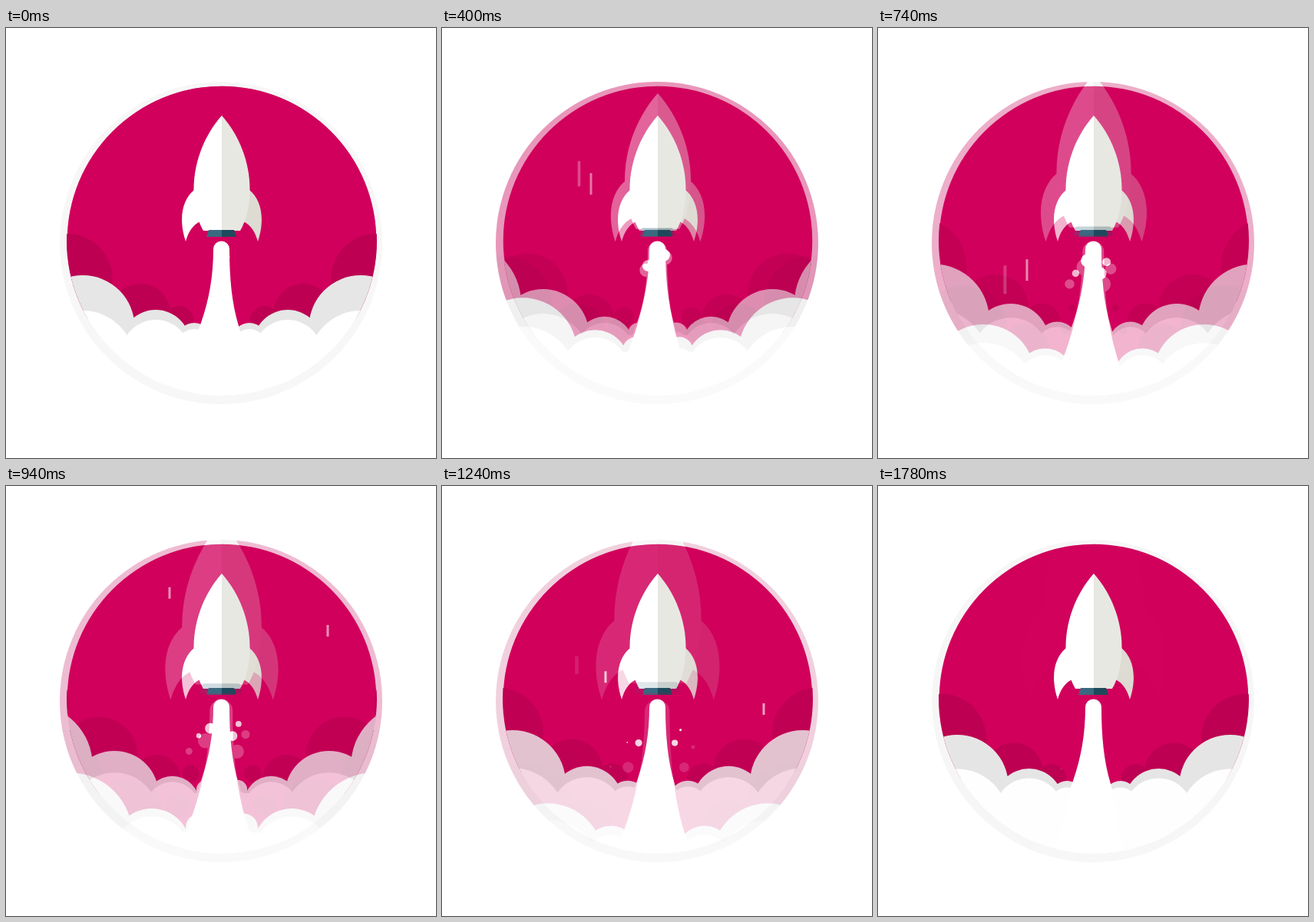
An HTML page that plays this animation: 560x560 px, repeating every 1.8 s.

```html
<!DOCTYPE html>
<html lang="en">
<head>
<meta charset="utf-8">
<title>Rocket launch</title>
<style>
  html, body { margin: 0; width: 100%; height: 100%; overflow: hidden; background: #fff; }
  svg { display: block; width: 100vw; height: 100vh; }
</style>
</head>
<body>
<svg viewBox="0 0 560 560">
  <defs>
    <clipPath id="disc"><circle cx="281" cy="277" r="202"/></clipPath>
    <clipPath id="rim"><circle cx="280" cy="280" r="210"/></clipPath>
    <path id="fin" d="M245 211C230 223 224 248 234 278C238 264 244 256 253 252Z"/>
    <path id="hull" d="M281 114C258 140 244.500 175 244.500 210C244.500 232 249 250 257 264H281Z"/>
  </defs>
  <circle cx="280" cy="280" r="210" fill="#f7f7f7"/>
  <g clip-path="url(#rim)">
    <g id="scene">
      <g clip-path="url(#disc)">
        <circle cx="281" cy="277" r="201.300" fill="#d1005c"/>
        <path id="dark" fill="#bd0052"/>
        <path id="streaks" stroke="#fff" stroke-width="3" opacity=".75"/>
        <path id="gray" fill="#e6e6e6"/>
        <path id="white" fill="#fff"/>
        <path id="bubbles" fill="#fff"/>
        <path fill="#fff" d="M270 288A10.500 10.500 0 0 1 291 288C291 325 294 358 303 388L312 420H242L251 392C264 358 270 325 270 288Z"/>
        <use href="#fin" fill="#fff"/>
        <use href="#fin" fill="#dedbd3" transform="matrix(-1 0 0 1 562 0)"/>
        <use href="#hull" fill="#fff"/>
        <use href="#hull" fill="#e8e8e2" transform="matrix(-1 0 0 1 562 0)"/>
        <path fill="#3a6a80" d="M264 263H281V272H261Z"/>
        <path fill="#1f4a5c" d="M281 263H297L300 272H281Z"/>
      </g>
    </g>
    <use id="ghost" href="#scene"/>
  </g>
</svg>
<script>
const LOOP = 1800, PUFF = 600, MID = 281;
const $ = id => document.getElementById(id);

// How far a puff has rolled from the middle after each PUFF.
const reach = [0, 36, 86, 181, 300];

// A puff of age s (in PUFFs) has radius size * s and its peak at top(s).
const clouds = {
  dark: { size: 19.5, shift: 20, top: s => 355 + 25 * s - 18 * s * s },
  gray: { size: 22.5, shift: 0, top: s => 373 + 25 * s - 14 * s * s },
  white: { size: 22.5, shift: 0, top: s => 404 - 12 * s }
};

// start ms, start y, speed in x and y (px per second)
const bubbles = [[485, 287, -33, 63], [420, 310, 27, 30], [100, 288, 26, 26], [0, 298, -32, 29]];

// start ms, x, length, speed
const streaks = [[0, 194, 28, 330], [575, 419, 15, 340], [735, 213, 15, 365]];

const disc = (x, y, r) =>
  `M${x - r} ${y}a${r} ${r} 0 1 1 ${2 * r} 0a${r} ${r} 0 1 1 ${-2 * r} 0z`;

function puffs({ size, shift, top }, k) {
  let d = '';
  for (let i = 0; i < 4; i++) {
    const s = i + k, r = size * s, y = top(s) + r;
    const x = shift + reach[i] + (reach[i + 1] - reach[i]) * k;
    d += disc(MID - x, y, r) + disc(MID + x, y, r);
  }
  return d;
}

function bubble(t, [t0, y, vx, vy]) {
  const s = (t - t0) / 1000, r = 10.4 - 7.7 * s;
  return s < 0 || r <= 0 ? '' : disc(MID + vx * s, y + vy * s, r);
}

function streak(t, [t0, x, len, v]) {
  const age = t - t0;
  return age < 0 || age > 800 ? '' : `M${x} ${57 + v * age / 1000}v${len}`;
}

function draw(now) {
  const t = now % LOOP, p = t / LOOP, k = t % PUFF / PUFF;
  const setPath = (id, d) => $(id).setAttribute('d', d);

  for (const id in clouds) setPath(id, puffs(clouds[id], k));
  setPath('white', $('white').getAttribute('d') + 'M60 400H500V500H60z');
  setPath('bubbles', bubbles.map(b => bubble(t, b)).join(''));
  setPath('streaks', streaks.map(s => streak(t, s)).join(''));

  $('ghost').setAttribute('transform',
    `translate(281 277) scale(${1 + 0.8 * p}) translate(-281 -277)`);
  $('ghost').setAttribute('opacity', 0.5 * (1 - p));
}

let start;
function tick(now) {
  start ??= now;
  draw(now - start);
  requestAnimationFrame(tick);
}
draw(0);
requestAnimationFrame(tick);
</script>
</body>
</html>
```
